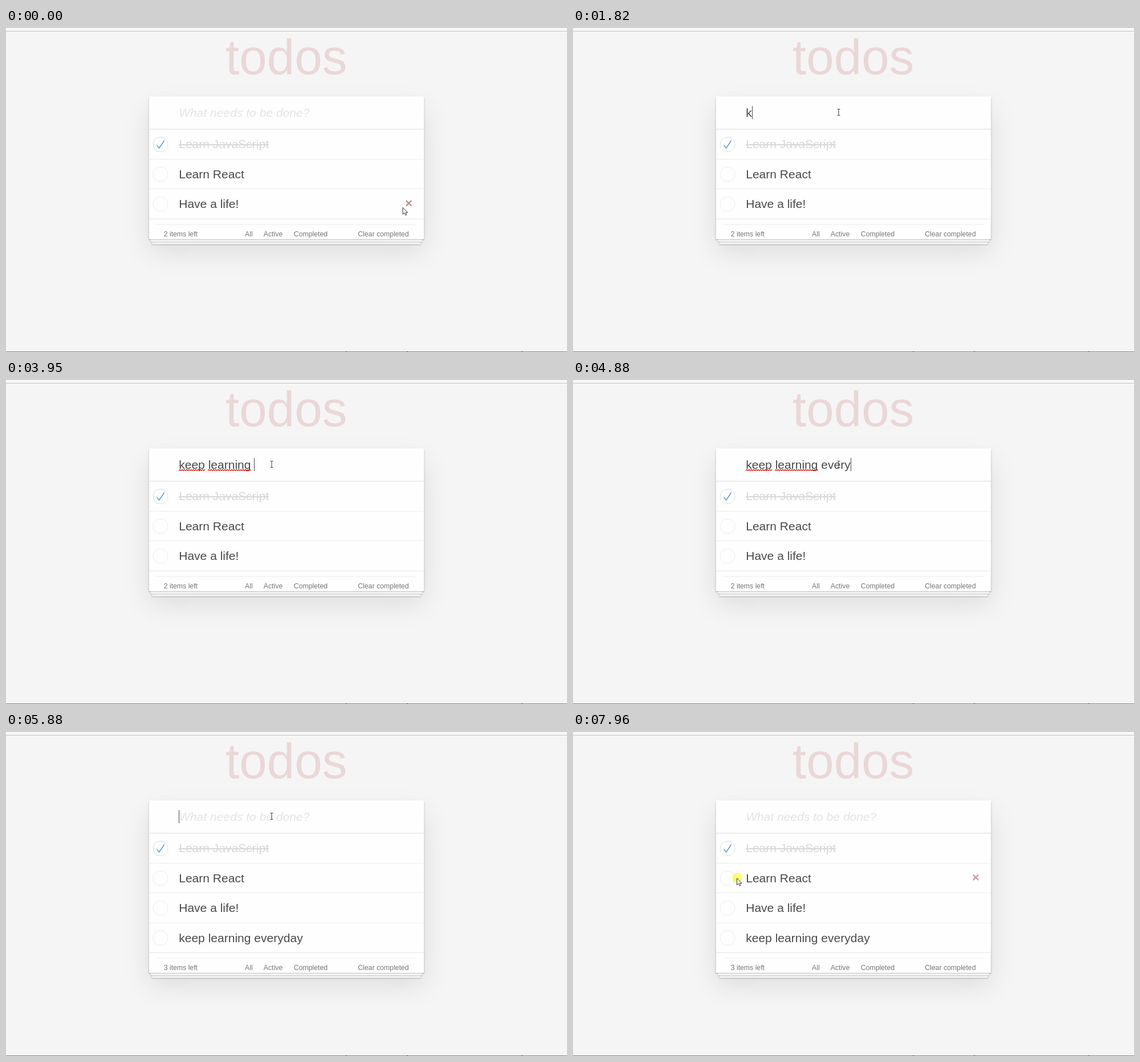
These frames come from a looping animation (984x569 px, 8000 ms). An HTML page:

```html
<!DOCTYPE html>
<html lang="en">
<head>
<meta charset="utf-8">
<title>todos</title>
<style>
  html, body { margin: 0; width: 100%; height: 100%; overflow: hidden; background: #f5f5f5; }
  #stage { position: absolute; left: 0; top: 0; width: 984px; height: 569px; overflow: hidden; }
  #card, #stack { position: absolute; left: 250.5px; width: 482.5px; }
  #card {
    top: 120px; background: #fefefe;
    box-shadow: 0 1.75px 3.5px rgba(0,0,0,.2), 0 22px 44px rgba(0,0,0,.1);
  }
  #stack {
    height: 44px;
    box-shadow: 0 1px 1px rgba(0,0,0,.2),
      0 7px 0 -2.6px #f6f6f6, 0 8px 1px -2.6px rgba(0,0,0,.2),
      0 14px 0 -5.3px #f6f6f6, 0 15px 2px -5.3px rgba(0,0,0,.2);
  }
  svg { position: absolute; left: 0; top: 0; }
  text { font-family: "Liberation Sans", Arial, sans-serif; font-size: 21.04px; fill: #4a4a4a; white-space: pre; }
  .title { font-size: 87.2px; fill: #ead7d7; text-anchor: middle; }
  .hint { font-style: italic; fill: #e4e4e4; }
  .done { fill: #d8d8d8; text-decoration: line-through; }
  .small text { font-size: 12.28px; fill: #777; }
</style>
</head>
<body>
<div id="stage">
  <div id="card"></div>
  <div id="stack"></div>
  <svg width="984" height="569" viewBox="0 0 984 569" fill="none">
    <rect width="984" height="5" fill="#f8f8f8"/>
    <path d="M0 5.5H984" stroke="#c4c4c4"/>
    <path d="M0 568.5H984" stroke="#858585"/>
    <path d="M596 568.5h2M703 568.5h2M904 568.5h2" stroke="#333"/>
    <text class="title" x="491.75" y="81.3">todos</text>
    <rect x="250.5" y="176.7" width="482.5" height="2" fill="#ececec"/>
    <text id="hint" class="hint" x="303.2" y="155.8">What needs to be done?</text>
    <text id="typed" x="303.2" y="156"></text>
    <path id="wavy" stroke="#e01c18" stroke-width="1.4"/>
    <rect id="caret" y="137" width="1" height="23" fill="#4a4a4a"/>
    <g id="rows"></g>
    <g id="footer" class="small">
      <path d="M250.5 335.5H733" stroke="#e6e6e6"/>
      <path d="M264 345H720" stroke="#ececec"/>
      <text id="count" x="276.7" y="366.2"></text>
      <text x="419" y="366.2">All</text>
      <text x="451.8" y="366.2">Active</text>
      <text x="504.8" y="366.2">Completed</text>
      <text x="617.2" y="366.2">Clear completed</text>
    </g>
    <path id="cross" d="M-4.7 -4.7L4.7 4.7M4.7 -4.7L-4.7 4.7" stroke-width="2.3"/>
    <circle id="click" r="9" fill="#ffff78" style="mix-blend-mode:multiply"/>
    <path id="arrow" d="M0 .3V12.2L2.8 9.7L4.8 13.8L6.7 12.9L4.8 9H8.6Z" fill="#fff" stroke="#333" stroke-width="1"/>
    <path id="beam" d="M-2.5 -5.5H2.5M0 -5.5V5.5M-2.5 5.5H2.5" stroke="#4a4a4a" stroke-width="1.1"/>
  </svg>
</div>
<script>
const LOOP = 8000, ROW = 52.4, LIST_TOP = 178.1, LEFT = 303;
const PHRASE = "keep learning everyday";
const KEYS = [1820, 1890, 2090, 2220, 2350, 2480, 2610, 2810, 2880, 3150, 3350,
  3550, 3650, 3750, 4150, 4350, 4480, 4610, 4880, 5080, 5210, 5410];
const SPELLCHECK = 3950, SUBMIT = 5810, ADDED = 5880;
const CARET_ON = [[820, 1350], [1820, 6470], [7000, 7530]];
const CLICKS = [[820, 950], [7960, LOOP]];

const $ = id => document.getElementById(id);
const show = (el, on) => el.setAttribute("visibility", on ? "visible" : "hidden");
const move = (el, x, y) => el.setAttribute("transform", `translate(${x} ${y})`);
const within = (spans, t) => spans.some(([a, b]) => t >= a && t < b);
const ease = u => u * u * (3 - 2 * u);
const mix = (a, b, u) => a + (b - a) * u;
const bezier = (a, b, c, u) => mix(mix(a, b, u), mix(b, c, u), u);

function rowMarkup(label, i) {
  const done = i === 0, y = i * ROW;
  const line = Math.floor(LIST_TOP + y + ROW) + .5;
  const tick = done
    ? `<path d="M264.4 205.6L268.6 211L277.6 198" stroke="#5b9bca" stroke-width="1.5"/>`
    : "";
  return `<g><circle cx="271" cy="${204.5 + y}" r="13" stroke="${done ? "#d8dedd" : "#ededed"}"/>${tick}
    <text class="${done ? "done" : ""}" x="${LEFT + .2}" y="${211.4 + y}">${label}</text>
    <path d="M250.5 ${line}H733" stroke="#ededed"/></g>`;
}

function zigzag(from, to) {
  let d = `M${from} 159`;
  for (let x = from + 2, up = true; x <= to; x += 2, up = !up) d += `L${x} ${up ? 157.4 : 159}`;
  return d;
}

function stepped(t, start, gap, count) {
  const k = t < start ? 0 : Math.floor((t - start) / gap) + 1;
  return ease(Math.min(k / count, 1));
}

function pointer(t) {
  if (t < 7220) {
    const u = stepped(t, 70, 68, 11);
    return [mix(696, 465.5, u), mix(315, 148, u)];
  }
  const u = stepped(t, 7220, 74, 10);
  return [bezier(465.5, 330, 287.5, u), bezier(148, 400, 256.5, u)];
}

function render(t) {
  const typing = t < SUBMIT;
  const text = typing ? PHRASE.slice(0, KEYS.filter(k => k <= t).length) : "";
  $("typed").textContent = text;
  show($("hint"), !text);
  show($("wavy"), typing && t >= SPELLCHECK);
  const width = text ? $("typed").getComputedTextLength() : 0;
  $("caret").setAttribute("x", Math.round(LEFT + width));
  show($("caret"), within(CARET_ON, t));

  const added = t >= ADDED, grow = added ? 52 : 0;
  show($("rows").lastElementChild, added);
  move($("footer"), 0, grow);
  $("card").style.height = 251 + grow + "px";
  $("stack").style.top = 327 + grow + "px";
  $("count").textContent = (typing ? 2 : 3) + " items left";

  const [x, y] = pointer(t);
  const row = Math.floor((y - LIST_TOP) / ROW);
  const inInput = row < 0;
  show($("arrow"), !inInput);
  show($("beam"), inInput);
  move($("arrow"), x, y);
  move($("beam"), x + .5, y);
  show($("cross"), !inInput);
  move($("cross"), 706.5, 203 + row * ROW);
  $("cross").setAttribute("stroke", x > 686 ? "#b98c80" : "#cc9a9a");
  show($("click"), within(CLICKS, t));
  move($("click"), inInput ? 464 : x + .5, inInput ? 147 : y - .5);
}

$("rows").innerHTML = ["Learn JavaScript", "Learn React", "Have a life!", PHRASE].map(rowMarkup).join("");
$("wavy").setAttribute("d", zigzag(303, 349) + zigzag(354, 430));

const began = performance.now();
function tick() {
  render((performance.now() - began) % LOOP);
  requestAnimationFrame(tick);
}
tick();
</script>
</body>
</html>
```
